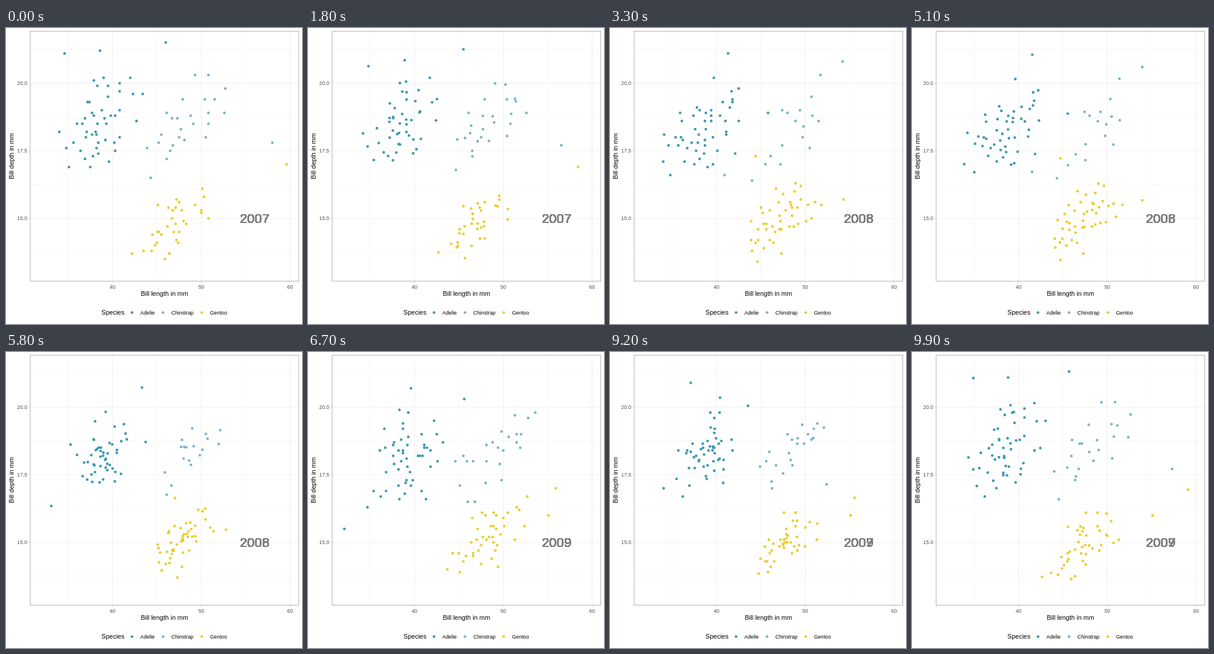
Animation of 504 by 504 pixels, one loop 10000 ms. Source, as an HTML page with a canvas:

```html
<!DOCTYPE html>
<html lang="en">
<head>
<meta charset="utf-8">
<title>Bill depth and length by year</title>
<style>
html, body { margin: 0; width: 100%; height: 100%; overflow: hidden; background: #fff; }
canvas { display: block; }
</style>
</head>
<body>
<canvas id="chart" width="504" height="504"></canvas>
<script>
// Each species is a correlated bell-shaped cloud per year (count, mean length, mean depth)
// plus a few fixed outlying rows: length and depth in each of the three years.
const adelie = {
  name: "Adelie", color: "#3B9AB2", spread: [2.2, 1.05], corr: 0.35,
  clouds: [[49, 38.8, 18.6], [50, 38.5, 18.2], [52, 39, 18]],
  fixed: {
    11: [37.8, 17.3, 41.3, 21.1, 45.6, 20.3],
    13: [38.6, 21.2, 41.1, 18.2, 42.2, 19.5],
    14: [34.6, 21.1, 36.4, 17.1, 39.6, 20.7],
    19: [46, 21.5, 41.8, 19.4, 41.1, 18.6],
    23: [38.2, 18.1, 45.8, 18.9, 41.4, 18.5],
    42: [36, 18.5, 34, 17.1, 32.1, 15.5]
  }
};
const chinstrap = {
  name: "Chinstrap", color: "#78B7C5", spread: [2.6, 1], corr: 0.65,
  clouds: [[26, 48.5, 18.6], [18, 48.7, 18.4], [24, 48.9, 18.3]],
  fixed: {
    4: [52.7, 19.8, 40.9, 16.6, 51.5, 18.7],
    5: [45.2, 17.8, 54.2, 20.8, 49.8, 17.3],
    17: [58, 17.8, 45.5, 17, 46.8, 16.5]
  }
};
const gentoo = {
  name: "Gentoo", color: "#EBCC2A", spread: [2.4, 0.8], corr: 0.65,
  clouds: [[34, 46.7, 14.7], [46, 46.9, 14.8], [43, 48.1, 15.1]],
  fixed: {
    3: [50, 15.2, 44.4, 17.3, 50, 15.9],
    21: [45.1, 14.5, 45, 15.4, 55.9, 17],
    29: [50, 15.3, 54.3, 15.7, 48.1, 15.1],
    33: [59.6, 17, 49.5, 16.2, 51.5, 16.3],
    35: [50, 15, 50.7, 15, 55.1, 16]
  }
};
const species = [adelie, chinstrap, gentoo];

let seed = 7;
const random = () => (seed = seed * 16807 % 2147483647) / 2147483647;
const tenth = v => Math.round(v * 10) / 10;
const rowStep = [11, 17, 7];

// Golden-angle spiral with normal radii; the row step mixes the rows between years.
function makeCloud({ clouds, spread, corr, fixed }, year) {
  const [count, meanX, meanY] = clouds[year];
  return Array.from({ length: count }, (_, row) => {
    const k = row * rowStep[year] % count;
    const radius = Math.sqrt(-2 * Math.log(1 - 0.92 * (k + 0.5) / count));
    const angle = k * 2.4 + random() * 1.2;
    const u = radius * Math.cos(angle), v = radius * Math.sin(angle);
    if (fixed[row]) return fixed[row].slice(2 * year, 2 * year + 2);
    return [
      tenth(meanX + spread[0] * u),
      tenth(meanY + spread[1] * (corr * u + Math.sqrt(1 - corr * corr) * v))
    ];
  });
}
for (const s of species) s.years = [0, 1, 2].map(year => makeCloud(s, year));

const ctx = document.getElementById("chart").getContext("2d");
const left = 41.1, right = 498.5, upper = 5.5, lower = 431.1;
const xOf = v => left + (v - 30.725) / 30.25 * (right - left);
const yOf = v => upper + (21.92 - v) / 9.24 * (lower - upper);

function line(x1, y1, x2, y2, color, width) {
  ctx.strokeStyle = color;
  ctx.lineWidth = width;
  ctx.beginPath();
  ctx.moveTo(x1, y1);
  ctx.lineTo(x2, y2);
  ctx.stroke();
}

function text(str, x, y, size, color, align = "center") {
  ctx.font = `${size}px "Liberation Sans", Arial, sans-serif`;
  ctx.fillStyle = color;
  ctx.textAlign = align;
  ctx.fillText(str, x, y);
}

function dot(x, y, color) {
  ctx.fillStyle = color;
  ctx.beginPath();
  ctx.arc(x, y, 2.31, 0, 2 * Math.PI);
  ctx.fill();
}

function drawAxes() {
  const vertical = (v, w) => line(xOf(v), upper, xOf(v), lower, "#dedede", w);
  const horizontal = (v, w) => line(left, yOf(v), right, yOf(v), "#dedede", w);
  for (let v = 35; v < 60; v += 10) vertical(v, 0.27);
  for (let v = 13.75; v < 22; v += 2.5) horizontal(v, 0.27);
  for (let v = 40; v <= 60; v += 10) {
    vertical(v, 0.53);
    line(xOf(v), lower, xOf(v), lower + 2.75, "#b3b3b3", 0.53);
    text(v, xOf(v), 443.7, 8.8, "#4d4d4d");
  }
  for (let v = 15; v <= 20; v += 2.5) {
    horizontal(v, 0.53);
    line(left - 2.75, yOf(v), left, yOf(v), "#b3b3b3", 0.53);
    text(v.toFixed(1), 36.2, yOf(v) + 3.2, 8.8, "#4d4d4d", "right");
  }
  text("Bill length in mm", (left + right) / 2, 456, 11, "#000");
  ctx.save();
  ctx.translate(13.3, (upper + lower) / 2);
  ctx.rotate(-Math.PI / 2);
  text("Bill depth in mm", 0, 0, 11, "#000");
  ctx.restore();
}

function drawLegend() {
  text("Species", 162.6, 488.4, 11, "#000", "left");
  let x = 206;
  for (const { name, color } of species) {
    dot(x + 8.64, 484.6, color);
    text(name, x + 22.8, 487.8, 8.8, "#000", "left");
    x += 28.3 + ctx.measureText(name).width;
  }
}

// The year is printed once per data row, which hardens its edges.
function drawYear(year, rows) {
  for (let i = 0; i < rows; i++) text(year, xOf(56), yOf(15) + 8.2, 22.76, "#7f7f7f");
}

// Matched rows move linearly; surplus rows leave, and new ones arrive, at the end.
function drawPoints(from, to, t) {
  for (const { color, years } of species) {
    years[from].forEach(([x, y], row) => {
      const [endX, endY] = years[to][row] || [x, y];
      dot(xOf(x + (endX - x) * t), yOf(y + (endY - y) * t), color);
    });
  }
}

const moves = [{ start: 16, steps: 17 }, { start: 50, steps: 17 }, { start: 84, steps: 16 }];

function draw(tick) {
  const from = moves.findIndex(m => tick < m.start + m.steps);
  const to = (from + 1) % 3;
  const t = Math.max(0, (tick - moves[from].start) / moves[from].steps);

  ctx.fillStyle = "#fff";
  ctx.fillRect(0, 0, 504, 504);
  drawAxes();
  drawPoints(from, to, t);
  drawYear(2007 + (t < 0.5 ? from : to), 100);
  if (from === 2 && t >= 0.5) drawYear(2009, 10);
  ctx.strokeStyle = "#b3b3b3";
  ctx.lineWidth = 1.07;
  ctx.strokeRect(left, upper, right - left, lower - upper);
  drawLegend();
}

const begin = performance.now();
let last = -1;
function animate() {
  const tick = Math.floor((performance.now() - begin) / 100) % 100;
  if (tick !== last) draw(last = tick);
  requestAnimationFrame(animate);
}
animate();
</script>
</body>
</html>
```
